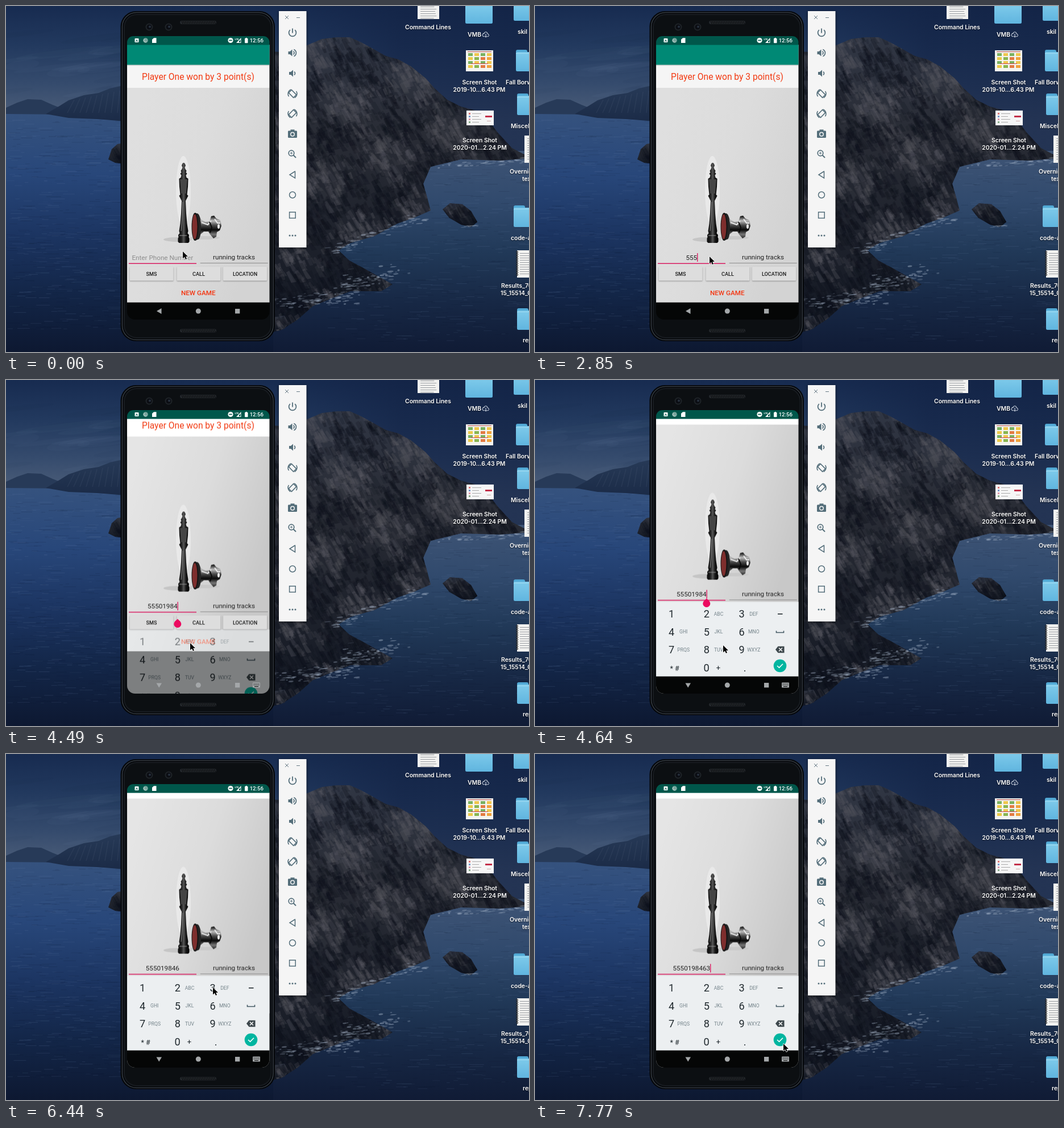
Recreate the animation shown at these times as an HTML page with a canvas. Size 920 px wide and 609 px high, loop 8000 ms.

```html
<!DOCTYPE html>
<html lang="en">
<head>
<meta charset="utf-8">
<title>Phone emulator</title>
<style>
html, body { margin: 0; width: 100%; height: 100%; overflow: hidden; background: #0d1830; }
canvas { display: block; width: 920px; height: 609px; }
</style>
</head>
<body>
<canvas id="stage" width="920" height="609"></canvas>
<script>
const W = 920, H = 609, LOOP = 8000;
const stage = document.getElementById('stage').getContext('2d');
let c = stage;

const NUMBER = '5550198463';
const TYPED = [1950, 2400, 2850, 3000, 3300, 3450, 3750, 4200, 5690, 6740];
const CARET_OFF = [[0, 600], [1050, 1500], [4940, 5390], [6140, 6740], [7170, 7620]];
const MOUSE = [
  [0, 311, 432], [600, 310, 437], [750, 309, 442], [900, 308, 443], [1050, 307, 441],
  [4200, 308, 444], [4350, 309, 446], [4490, 324, 463], [4640, 331, 467], [4790, 343, 463],
  [4940, 352, 454], [5090, 360, 444], [5240, 365, 435], [5390, 366, 434], [5690, 367, 440],
  [5840, 366, 443], [5990, 366, 432], [6140, 365, 418], [6440, 364, 411], [6890, 366, 414],
  [7030, 382, 436], [7170, 405, 468], [7320, 424, 496], [7470, 434, 506], [7620, 437, 508], [7770, 437, 510]
];

// ---- helpers ----
let seed = 7;
const rnd = () => (seed = (seed * 16807) % 2147483647) / 2147483647;
const box = (x, y, w, h, col) => { c.fillStyle = col; c.fillRect(x, y, w, h); };
function round(x, y, w, h, r, col) {
  c.beginPath(); c.roundRect(x, y, w, h, r); c.fillStyle = col; c.fill();
}
function trace(pts, close = true) {
  c.beginPath();
  for (let i = 0; i < pts.length; i += 2) c.lineTo(pts[i], pts[i + 1]);
  if (close) c.closePath();
}
function poly(col, ...pts) { trace(pts); c.fillStyle = col; c.fill(); }
function line(col, w, ...pts) { trace(pts, false); c.strokeStyle = col; c.lineWidth = w; c.stroke(); }
function disc(x, y, r, col, ry = r, rot = 0) {
  c.beginPath(); c.ellipse(x, y, r, ry, rot, 0, 7); c.fillStyle = col; c.fill();
}
function arc(x, y, r, col, w, a = 0, b = 7) {
  c.beginPath(); c.arc(x, y, r, a, b); c.strokeStyle = col; c.lineWidth = w; c.stroke();
}
function grad(x0, y0, x1, y1, ...cols) {
  const g = c.createLinearGradient(x0, y0, x1, y1);
  cols.forEach((k, i) => g.addColorStop(i / (cols.length - 1), k));
  return g;
}
function text(s, x, y, size, col, weight = 400, align = 'center', family = 'Roboto') {
  c.font = `${weight} ${size}px ${family}, sans-serif`;
  c.textAlign = align; c.textBaseline = 'alphabetic';
  c.fillStyle = col; c.fillText(s, x, y + size * 0.355);
}
function layer(draw) {
  const cv = document.createElement('canvas');
  cv.width = W; cv.height = H;
  const old = c;
  c = cv.getContext('2d'); draw(); c = old;
  return cv;
}
function within(clip, draw) { c.save(); clip(); c.clip(); draw(); c.restore(); }

// ---- desktop picture ----
function rocks(pts, n, x0, y0, x1, y1) {
  within(() => trace(pts), () => {
    box(x0, y0, x1 - x0, y1 - y0, grad(0, y0, 0, y1, '#303644', '#292c35', '#1e222c', '#121722'));
    for (let i = 0; i < n; i++) {
      const x = x0 + rnd() * (x1 - x0), y = y0 + rnd() * (y1 - y0);
      const fold = Math.sin(x / 23 - y / 31) + Math.sin(x / 51 + y / 19) + rnd() * 2 - 1;
      const len = 5 + rnd() * 15, w = 2 + rnd() * 5, lit = fold > 0.4;
      c.globalAlpha = 0.13 + rnd() * 0.2;
      poly(lit ? '#5a5a62' : '#0b0f19', x, y, x + w, y - w * 0.6, x + len, y + len * 0.9, x + len * 0.5, y + len);
    }
    c.globalAlpha = 1;
  });
}
function foam(x0, y0, x1, y1, n, spread) {
  for (let i = 0; i < n; i++) {
    const k = rnd(), d = (rnd() + rnd() - 1) * spread;
    c.globalAlpha = 0.15 + rnd() * 0.3;
    disc(x0 + (x1 - x0) * k + d, y0 + (y1 - y0) * k + d * 0.5, 1.5 + rnd() * 5, '#a9b8cc', 0.5 + rnd() * 1.2, -0.1);
  }
  c.globalAlpha = 1;
}
function waves(n, x0, x1, y0, y1) {
  for (let i = 0; i < n; i++) {
    const x = x0 + rnd() * (x1 - x0), y = y0 + rnd() * (y1 - y0), w = 5 + rnd() * 22;
    c.globalAlpha = 0.08 + rnd() * 0.1;
    box(x, y, w, 1, rnd() < 0.5 ? '#7089ae' : '#071328');
  }
  c.globalAlpha = 1;
}
function landscape() {
  box(0, 0, W, 280, grad(0, 0, 0, 205, '#172b50', '#22395e', '#354b6d', '#50617b'));
  box(460, 0, 460, 280, grad(460, 0, 920, 0, '#12224400', '#122244b0', '#122244b8'));
  for (let i = 0; i < 30; i++) {
    c.globalAlpha = 0.04;
    disc(rnd() * 240, 50 + rnd() * 110, 30 + rnd() * 60, i % 2 ? '#8797ae' : '#0b2045', 3 + rnd() * 6, -0.12);
  }
  c.globalAlpha = 1;
  box(0, 190, 480, 419, grad(0, 190, 0, 609, '#35527e', '#28477a', '#1c3562', '#132648', '#0d1831'));
  box(470, 255, 450, 354, grad(0, 255, 0, 609, '#3e5475', '#314a6d', '#213958', '#172845', '#101b35'));
  waves(600, 0, 210, 200, 570);
  waves(520, 560, 920, 275, 590);
  poly('#273a58', 0, 179, 20, 170, 38, 164, 62, 165, 82, 174, 100, 181, 100, 191, 0, 190);
  poly(grad(0, 140, 0, 202, '#273a57', '#1b2b47'),
    70, 190, 94, 176, 110, 166, 137, 157, 163, 153, 183, 145, 210, 139, 210, 203, 160, 199, 110, 197);
  for (let i = 0; i < 9; i++) line('#46567044', 1.5, 120 + i * 10, 165 - i * 2, 108 + i * 11, 188);
  rocks([186, 252, 196, 243, 212, 240, 212, 278, 192, 276, 180, 270], 30, 178, 238, 212, 280);

  rocks([465, 80, 500, 82, 530, 69, 556, 58, 582, 55, 605, 55, 625, 64, 645, 75, 668, 88, 690, 94,
    712, 106, 738, 127, 754, 145, 776, 165, 800, 177, 826, 184, 848, 201, 866, 224, 890, 250, 925, 268,
    870, 272, 800, 270, 747, 283, 734, 313, 741, 337, 747, 360, 717, 373, 688, 383, 648, 405, 606, 417,
    585, 430, 604, 448, 632, 463, 680, 490, 660, 502, 606, 502, 577, 513, 540, 528, 513, 552, 485, 570, 465, 575],
    4200, 465, 50, 920, 580);
  foam(480, 525, 600, 512, 80, 25);
  foam(575, 432, 730, 372, 70, 14);
  foam(600, 498, 700, 460, 60, 22);
  foam(750, 284, 925, 270, 50, 10);
  foam(640, 470, 560, 530, 35, 30);
  rocks([768, 358, 781, 347, 803, 349, 818, 361, 829, 380, 818, 389, 801, 385, 780, 373], 110, 765, 345, 832, 392);
  foam(795, 388, 830, 386, 12, 5);
  rocks([470, 548, 490, 545, 497, 558, 490, 568, 470, 570], 15, 470, 545, 498, 570);
}

// ---- desktop icons ----
function folder(x, y) {
  round(x, y, 20, 10, 3, '#51a9d5');
  round(x, y + 4, 48, 34, 2.5, grad(0, y, 0, y + 38, '#82cdec', '#60b5df'));
  box(x, y + 6, 48, 1, '#a0dbf2');
}
function sheet(x, y, w, h, rows) {
  box(x, y, w, h, '#f2f2f0');
  for (let i = 0; i < rows; i++) box(x + 5, y + 5 + i * 4, w * (0.45 + 0.3 * rnd()), 1, '#9a9da2');
}
function desktop() {
  const label = (s, x, y, align = 'center') => {
    c.shadowColor = '#000a'; c.shadowBlur = 2; c.shadowOffsetY = 1;
    text(s, x, y, 10.4, '#fff', 600, align, 'Inter');
    c.shadowColor = 'transparent';
  };
  sheet(724, -16, 38, 39, 9);
  label('Command Lines', 742.5, 37);
  folder(808, -7); label('VMB', 824, 50);
  c.lineCap = 'round';
  arc(841, 51, 3, '#dde4ee', 1, 1.6, 4.7); arc(844, 49, 3.3, '#dde4ee', 1, 3.1, 6.2);
  arc(847, 51.5, 2.5, '#dde4ee', 1, -1.5, 1.6);
  line('#dde4ee', 1, 844, 49, 844, 55, 842, 53); line('#dde4ee', 1, 844, 55, 846, 53);
  c.lineCap = 'butt';
  box(809, 78, 48, 37, '#f4f4f0');
  ['#ecca48', '#88b552', '#e37a42', '#efa23c'].forEach((k, i) => {
    for (let j = 0; j < 4; j++) box(813 + i * 11, 83 + j * 7, 8, 5, j % 2 ? k : i % 2 ? '#efc64c' : '#79b060');
  });
  box(812, 80, 42, 1, '#a44'); box(818, 101, 30, 1, '#c44');
  label('Screen Shot', 833, 134); label('2019-10...6.43 PM', 832.5, 147);
  box(810, 184, 48, 26, '#f6f6f6');
  for (let i = 0; i < 4; i++) {
    box(814, 188 + i * 5, 3, 3, ['#d77', '#79c', '#d9a', '#8a8'][i]);
    box(820, 189 + i * 5, 16 - i % 2 * 4, 1, '#aaa');
  }
  box(843, 193, 12, 3, '#c3304a'); box(846, 202, 7, 1, '#caa');
  label('Screen Shot', 833.5, 236); label('2020-01...2.24 PM', 833.5, 249);
  folder(893, -12); label('skil', 900, 45, 'left');
  folder(897, 77); label('Fall Borwin', 879, 134, 'left');
  folder(899, 154); label('Miscellany', 888, 211, 'left');
  sheet(912, 228, 38, 48, 10); label('Overnight', 886, 291, 'left'); label('text', 908, 304, 'left');
  folder(893, 351); label('code-along', 888, 408, 'left');
  sheet(899, 430, 38, 48, 10);
  for (let y = 433; y < 477; y += 4) arc(899, y, 1.5, '#222', 1);
  label('Results_701', 871, 492, 'left'); label('15_15514_01', 870, 505, 'left');
  folder(899, 532); label('reports', 909, 588, 'left');
}

// ---- emulator ----
function toolbar() {
  const k = '#546e7a';
  c.shadowColor = '#0008'; c.shadowBlur = 5;
  box(480, 9, 48.5, 416, '#f5f5f5');
  c.shadowColor = 'transparent';
  line('#667984', 1, 491, 17, 497, 23); line('#667984', 1, 497, 17, 491, 23); line('#667984', 1, 511, 20.5, 517, 20.5);
  arc(504, 47, 6.4, k, 1.8, -0.85, 4); line(k, 1.8, 504, 39.5, 504, 47.5);
  const speaker = (x, y) => poly(k, x, y - 2.5, x + 3, y - 2.5, x + 7, y - 6, x + 7, y + 6, x + 3, y + 2.5, x, y + 2.5);
  speaker(496.5, 82.5); arc(504, 82.5, 3, k, 1.7, -1.1, 1.1); arc(504, 82.5, 6.5, k, 1.7, -1.2, 1.2);
  speaker(498, 118.5); arc(505.5, 118.5, 3, k, 1.7, -1.1, 1.1);
  for (const [y, dir] of [[154.5, 1], [189.5, -1]]) {
    c.save(); c.translate(504, y); c.scale(dir, 1);
    c.rotate(Math.PI / 4);
    c.strokeStyle = k; c.lineWidth = 1.7; c.strokeRect(-6, -3.7, 12, 7.4);
    c.restore();
    c.save(); c.translate(504, y); c.scale(dir, 1);
    arc(0, 0, 8, k, 1.5, 2.5, 4.4); arc(0, 0, 8, k, 1.5, -0.6, 1.1);
    c.restore();
  }
  round(496, 219.5, 16, 12.5, 1.5, k); box(500.5, 217.5, 7, 3, k);
  disc(504, 225.7, 4, '#f5f5f5'); disc(504, 225.7, 2.5, k);
  arc(502, 259, 4.8, k, 1.7); line(k, 2, 505.5, 262.5, 510, 267);
  line(k, 1, 499.7, 259, 504.3, 259); line(k, 1, 502, 256.7, 502, 261.3);
  line(k, 1.5, 508.5, 291, 499, 297, 508.5, 303, 508.5, 290.4);
  arc(504, 332.5, 5.5, k, 1.5);
  c.strokeStyle = k; c.lineWidth = 1.5; c.strokeRect(498.6, 362.8, 10.6, 10.6);
  for (const x of [499, 504, 509]) disc(x, 404, 1.5, k);
}
function grille(y) {
  round(306, y, 64, 6, 3, '#23272b');
  for (let x = 309; x < 368; x += 3) { box(x, y + 1, 1.4, 1.6, '#070809'); box(x + 1, y + 3.5, 1.4, 1.6, '#070809'); }
}
function shell() {
  round(470, 146, 4, 31, 1, '#15191d'); round(470, 199, 4, 60, 1, '#15191d');
  round(201.5, 9, 271.5, 581, 27, '#05070a');
  c.beginPath(); c.roundRect(204.5, 11.5, 265.5, 576, 25);
  c.strokeStyle = '#353b42'; c.lineWidth = 1.5; c.stroke();
  c.beginPath(); c.roundRect(208, 15, 258.5, 569, 22);
  c.fillStyle = '#0c0f12'; c.fill(); c.strokeStyle = '#171b20'; c.lineWidth = 2; c.stroke();
  for (const x of [252, 286]) {
    disc(x, 37, 6.5, '#1f2428'); disc(x, 37, 4.5, '#0b0d13'); disc(x + 1, 36.5, 2, '#27303d');
  }
  grille(26); grille(568.5);
}
const screenPath = () => { c.beginPath(); c.roundRect(213, 53, 250.5, 499, [11, 11, 14, 14]); };

function statusBar() {
  box(213, 53, 251, 15.5, '#00574b');
  round(226.5, 57, 7, 7, 1, '#fff'); text('A', 230, 60.6, 6, '#00574b', 700);
  disc(245.5, 60.5, 4.3, '#79a69e'); arc(245.5, 60.5, 3, '#c6d8d4', 1, 1, 4);
  poly('#fff', 257, 59, 260, 56.3, 264.5, 56.3, 264.5, 65, 257, 65);
  disc(395, 60.5, 4.6, '#fff'); box(392.3, 59.7, 5.4, 1.6, '#00574b');
  text('LTE', 406, 58, 4.4, '#fff', 700);
  poly('#fff', 405, 65, 413.5, 56, 413.5, 65); poly('#00574b', 410, 62, 412.5, 59, 412.5, 64, 410, 64);
  round(420, 57, 5.5, 8.3, 0.8, '#fff'); box(421.5, 56, 2.5, 1.5, '#fff');
  text('12:56', 453, 60.7, 9.6, '#fff', 500, 'right');
}

// ---- app content, resting position ----
function photo(bright) {
  const tones = bright ? ['#e5e5e5', '#dcdcdc', '#c8c8c8'] : ['#dfdfdf', '#dcdcdc', '#d3d3d3'];
  box(213, 144, 251, 378, grad(213, 250, 463, 330, ...tones));
  disc(312, 325, 13, '#e9e9e9', 61);
  disc(302, 411, 25, '#c5c5c5', 4); disc(350, 408, 26, '#c9c9c9', 3);
  const steel = grad(304, 0, 321, 0, '#111', '#1c1c1c', '#555', '#161616', '#050505');
  // half widths down the standing piece
  const prof = [276, 1, 278, 2.5, 281, 3.5, 284, 2, 287, 3, 290, 5, 293, 4, 295, 6, 298, 4, 302, 5, 304, 8, 318, 7.5,
    332, 6, 334, 8, 338, 6, 343, 3.5, 365, 4.5, 383, 6, 396, 8, 400, 7, 403, 9.5, 407, 9, 409, 10, 415, 10, 417, 8];
  c.beginPath();
  for (let i = 0; i < prof.length; i += 2) c.lineTo(312.5 - prof[i + 1], prof[i]);
  for (let i = prof.length - 2; i >= 0; i -= 2) c.lineTo(312.5 + prof[i + 1], prof[i]);
  c.closePath(); c.fillStyle = steel; c.fill();
  poly('#454545', 306, 305, 319, 305, 317, 330, 308, 330);
  line('#888', 1, 311, 345, 310, 372, 308, 396);
  line('#999', 1, 305, 404, 318, 404);
  // fallen piece
  const metal = grad(0, 370, 0, 410, '#141414', '#bdbdbd', '#4a4a4a', '#080808', '#777', '#1b1b1b');
  poly(metal, 333, 364, 339, 367, 343, 376, 351, 380, 358, 379, 361, 370, 366, 369, 370, 374, 377, 377, 379, 387,
    376, 395, 371, 398, 370, 406, 365, 409, 359, 402, 356, 397, 348, 397, 341, 403, 337, 411, 333, 413);
  disc(337, 388, 6, '#252525', 23, -0.03);
  disc(332.5, 388.5, 6, '#151515', 24.5); disc(332, 388.5, 4.5, '#7e2e2d', 22);
  line('#e6e6e6', 2, 344, 381, 355, 385, 361, 378); line('#eee', 2, 367, 375, 372, 382, 377, 382);
  line('#090909', 2, 358, 380, 362, 390, 359, 399); disc(374, 388, 2, '#ececec', 4);
}
function button(x, w, s) {
  c.shadowColor = '#0005'; c.shadowBlur = 2; c.shadowOffsetY = 1;
  round(x, 459, w, 24.5, 1, '#dddddd');
  c.shadowColor = 'transparent'; c.shadowOffsetY = 0;
  text(s, x + w / 2, 471.3, 9.1, '#181818', 500);
}
function content(bright) {
  box(213, 68, 251, 76, bright ? '#fff' : '#f5f5f5');
  photo(bright);
  text('Player One won by 3 point(s)', 338, 124.5, 15.6, '#f23a12');
  text('running tracks', 401, 442, 11.7, '#222');
  box(341.7, 452, 119, 1, '#8c8c8c');
  box(216, 452.5, 119, 1.5, '#d81b60');
  button(217.5, 77, 'SMS'); button(300.5, 77, 'CALL'); button(382, 77, 'LOCATION');
  text('NEW GAME', 338.3, 505, 11.7, '#f43510', 500);
}

// ---- on-screen keypad, open position ----
function keypad() {
  const ink = '#20292e', soft = '#74838a';
  box(213, 390.5, 251, 180, '#eceff1');
  const letters = ['', 'ABC', 'DEF', 'GHI', 'JKL', 'MNO', 'PRQS', 'TUV', 'WXYZ'];
  letters.forEach((s, i) => {
    const x = 240 + (i % 3) * 61.8, y = 411.7 + Math.floor(i / 3) * 31.6;
    text(i + 1, x, y, 18.2, ink);
    text(s, x + 21.2, y, 8.6, soft);
  });
  text('* #', 245.5, 507.5, 12.5, ink); text('0', 301.7, 507, 18.2, ink);
  text('+', 322.5, 506.5, 13, ink); text('.', 369, 507, 18, ink);
  box(427, 411, 8.5, 1.6, ink);
  line('#455a64', 1.6, 424.5, 441.5, 424.5, 444.5, 437.5, 444.5, 437.5, 441.5);
  poly('#3d474c', 423, 474.5, 427.5, 468.8, 438.5, 468.8, 438.5, 480.2, 427.5, 480.2);
  line('#fff', 1.4, 429, 471.5, 435, 477.5); line('#fff', 1.4, 435, 471.5, 429, 477.5);
  disc(431, 503, 11.3, '#00b5a0'); line('#fff', 1.6, 426, 503, 429.5, 506.3, 436, 499.8);
}
function navBar(open) {
  const k = '#a4a7a9';
  if (open) {
    poly(k, 264.5, 533.5, 274, 533.5, 269.2, 541.5);
    round(434, 532.5, 13, 9, 1, k);
    for (let i = 0; i < 10; i++) box(435.5 + (i % 5) * 2.2, 534.3 + Math.floor(i / 5) * 2.2, 1.1, 1.1, '#111');
    box(437, 539, 7, 1, '#111');
  } else poly(k, 273.5, 532, 273.5, 542, 265, 537);
  disc(338.3, 537, 4.5, k); box(403, 533, 8.3, 8.3, k);
}
function pointer(x, y) {
  trace([x, y, x, y + 12.5, x + 3, y + 9.8, x + 5, y + 14, x + 7, y + 13, x + 5.2, y + 9, x + 9, y + 9]);
  c.lineJoin = 'round';
  c.strokeStyle = '#fff'; c.lineWidth = 1.4; c.stroke(); c.fillStyle = '#000'; c.fill();
}

function phoneNumber(t) {
  const n = TYPED.filter(k => k <= t).length;
  if (!n) text('Enter Phone Number', 275.3, 442.5, 11.7, '#8d8d8d');
  else text(NUMBER.slice(0, n), 275.3, 442.5, 11.7, '#222');
  const half = n ? c.measureText(NUMBER.slice(0, n)).width / 2 : 0;
  if (!CARET_OFF.some(([a, b]) => t >= a && t < b)) box(275.2 + half, 435, 1.4, 15, '#d81b60');
}
function handle(y) {
  disc(301.8, y, 6.5, '#ec0a60');
  poly('#ec0a60', 301.8, y - 9, 307, y - 4, 296.6, y - 4);
}

const backdrop = layer(() => { landscape(); desktop(); toolbar(); shell(); });
const calm = layer(() => content(false)), lifted = layer(() => content(true));
const keys = layer(keypad);

function frame(t) {
  const moving = t >= 4490 && t < 4640, open = t >= 4490;
  const lift = moving ? 44.5 : open ? 65.5 : 0;
  c.drawImage(backdrop, 0, 0);
  within(screenPath, () => {
    box(213, 53, 251, 499, '#050606');
    within(() => { c.beginPath(); c.rect(213, 68, 251, 453.7); }, () => {
      c.translate(0, -lift);
      c.drawImage(open ? lifted : calm, 0, 0);
      phoneNumber(t);
    });
    if (!open) {
      box(213, 68, 251, 35.5, '#008975');
      box(213, 103.5, 251, 2, grad(0, 103, 0, 106, '#0004', '#0000'));
    }
    statusBar();
    if (moving) {
      c.globalAlpha = 0.52;
      c.drawImage(keys, 0, 48.7);
      c.globalAlpha = 1;
    } else if (open) {
      c.drawImage(keys, 0, 0);
      box(213, 521.7, 251, 31, '#050606');
    }
    navBar(open);
    if (open && t < 5690) handle(moving ? 429.5 : 393.5);
  });
  const [, x, y] = MOUSE.filter(m => m[0] <= t).pop();
  pointer(x, y);
}

const start = performance.now();
function tick() {
  frame((performance.now() - start) % LOOP);
  requestAnimationFrame(tick);
}
tick();
</script>
</body>
</html>
```
